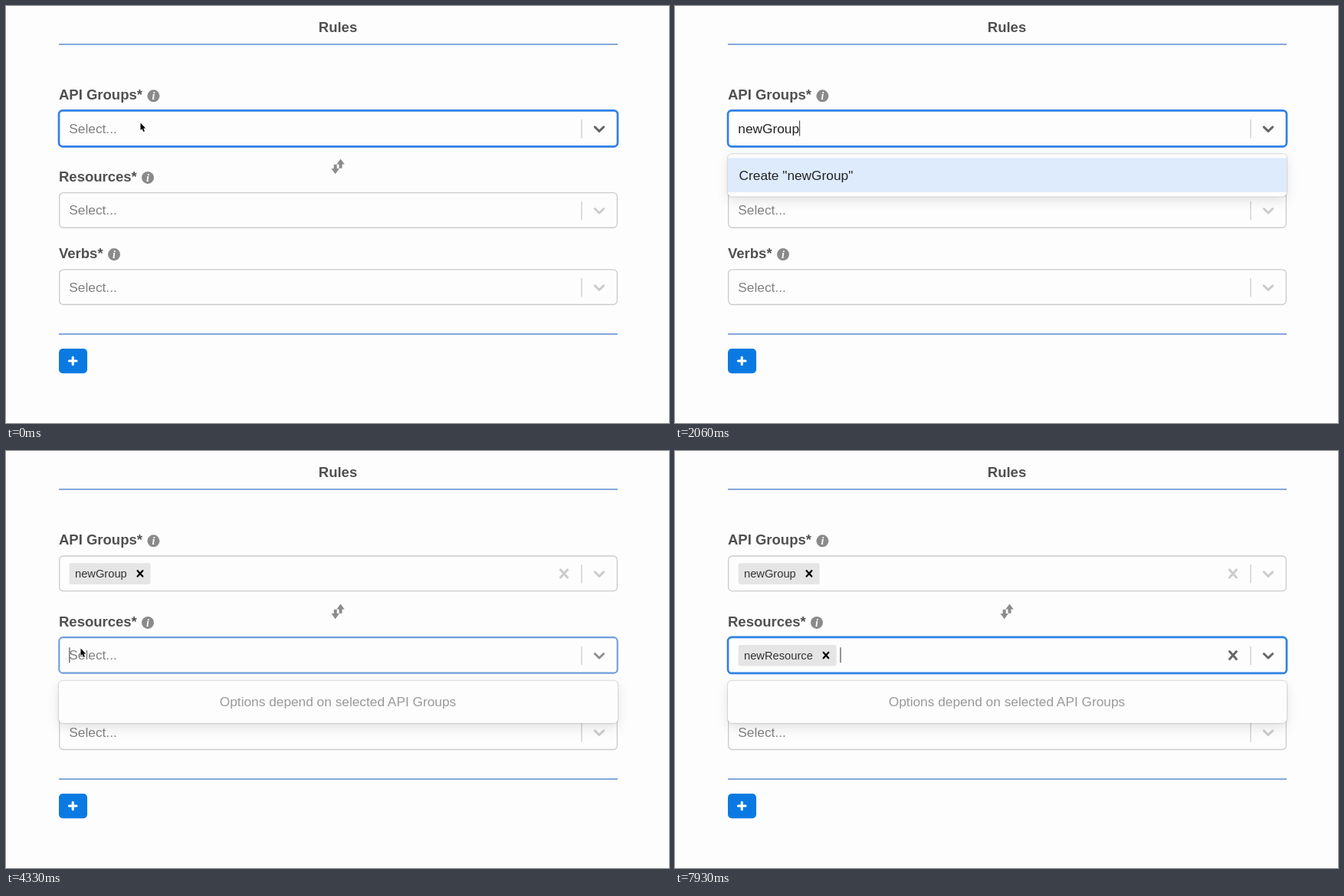
These frames come from a looping animation (865 by 544 pixels, 8000 ms). An HTML page:

```html
<!DOCTYPE html>
<html lang="en">
<head>
<meta charset="utf-8">
<title>Rules form</title>
<style>
  html, body { margin: 0; width: 100%; height: 100%; overflow: hidden; background: #fdfdfd; }
  svg { display: block; width: 100%; height: 100%; }
  text { font: 17.3px "Liberation Sans", Arial, sans-serif; fill: #222; white-space: pre; }
  .label { font-weight: bold; font-size: 18.5px; fill: #505050; }
  .hint { fill: #808080; }
  .note { fill: #999; }
  .tag { font-size: 14.7px; fill: #333; }
  .info { font: italic bold 14px "Liberation Serif", serif; fill: #fdfdfd; }
  .mid { text-anchor: middle; }
  .icon { fill: none; stroke-linecap: round; stroke-linejoin: round; }
</style>
</head>
<body>
<svg viewBox="0 0 865 544">
  <defs>
    <filter id="shadow" x="-10%" y="-60%" width="120%" height="220%">
      <feDropShadow dx="0" dy="5.3" stdDeviation="7.3" flood-color="#000" flood-opacity=".11"/>
    </filter>
  </defs>
  <g id="scene"></g>
</svg>
<script>
const LOOP = 8000, LEFT = 69, RIGHT = 798, ROW = 44.6;
const BLUE = [47, 128, 230], PALE = [204, 204, 204], DARK = [102, 102, 102];

const GROUPS = ['" " (core)', 'extensions', 'apps', 'events.k8s.io', 'authorization.k8s.io',
  'autoscaling', 'batch', 'networking.k8s.io', 'rbac.authorization.k8s.io',
  'settings.k8s.io', 'coordination.k8s.io'];

const GROUP = { word: 'newGroup', keys: [660, 860, 1060, 1330, 1530, 1700, 1860, 2060], enter: 2460 };
const RESOURCE = {
  word: 'newResource',
  keys: [4930, 5200, 5460, 5660, 6130, 6400, 6600, 6800, 7000, 7200, 7330], enter: 7860
};
const BLUR = 3800, FOCUS = 4240, OPEN = 4330;

// [time, x, y] of the pointer tip
const PATH = [[0, 175.5, 152.5], [3060, 175.5, 152.5], [3500, 75, 166], [3800, 28, 172],
  [3930, 28, 172], [4330, 97.5, 257.5], [4530, 95, 256.5], [LOOP, 95, 256.5]];

const pen = document.createElement('canvas').getContext('2d');
const widthOf = (s, size) => {
  pen.font = `${size}px "Liberation Sans", Arial, sans-serif`;
  return pen.measureText(s).width;
};
const clamp = v => Math.max(0, Math.min(1, v));
const mix = (a, b, k) => `rgb(${a.map((v, i) => Math.round(v + (b[i] - v) * k))})`;
const escape = s => s.replace(/&/g, '&amp;').replace(/</g, '&lt;');
const text = (x, y, s, cls = '') => `<text x="${x}" y="${y}" class="${cls}">${escape(s)}</text>`;
const rect = (x, y, w, h, fill, r = 0, more = '') =>
  `<rect x="${x}" y="${y}" width="${w}" height="${h}" rx="${r}" fill="${fill}" ${more}/>`;
const stroke = (d, color, width) =>
  `<path class="icon" d="${d}" stroke="${color}" stroke-width="${width}"/>`;
const rule = y => rect(LEFT, y - .7, RIGHT - LEFT, 1.4, '#5083cc');

const chevron = (y, color) => stroke(`M768.3 ${y - 2.6}l5.7 5.5 5.7-5.5`, color, 3);
const cross = (x, y, s, color) =>
  stroke(`M${x - 4.5 * s} ${y - 5 * s}l${9 * s} ${10 * s}m0 ${-10 * s}l${-9 * s} ${10 * s}`, color, 3 * s);

function label(s, y) {
  const x = LEFT + widthOf(s, 18.5) * 1.0;
  const at = { 'API Groups*': 192.4, 'Resources*': 185, 'Verbs*': 141 }[s] || x;
  return text(LEFT, y, s, 'label') + `<circle cx="${at}" cy="${y - 5}" r="8" fill="#8a8a8a"/>` +
    text(at, y - .4, 'i', 'info mid');
}

function tag(s, mid, hot) {
  const split = 90 + widthOf(s, 14.7) + 3.8;
  return rect(82.6, mid - 13.8, split + 27 - 82.6, 27.6, '#e5e5e5', 2.7) +
    (hot ? rect(split, mid - 13.8, 27, 27.6, '#f9b5ab', 2.7) : '') +
    text(90, mid + 5.1, s, 'tag') + cross(split + 13.4, mid - .2, .74, hot ? '#cb1f17' : '#000');
}

// A select box whose focus ring grows with k from 0 to 1
function select(top, { k = 0, typed = '', value = '', caret = false, hot = false } = {}) {
  const mid = top + 23.8, line = 1.33 + 1.33 * k, inset = .67 - .67 * k;
  const tone = mix(PALE, DARK, k);
  let out = rect(LEFT + inset, top + inset, RIGHT - LEFT - 2 * inset, 47 - 2 * inset, '#fdfdfd', 5,
    `stroke="${mix(PALE, BLUE, k)}" stroke-width="${line}"`);
  if (value) out += tag(value, mid, hot) + cross(728, mid - .2, 1, tone);
  else out += text(82.3, mid + 5.5, typed || 'Select...', typed ? '' : 'hint');
  if (caret) {
    const x = value ? 90 + widthOf(value, 14.7) + 35.6 : 82.3 + widthOf(typed, 17.3);
    out += rect(x, mid - 10.5, 1.1, 20, '#444');
  }
  return out + rect(750.4, mid - 12, 1.3, 24.5, '#ccc') + chevron(mid + .4, tone);
}

function menu(top, rows, { thumb = 0, note = '' } = {}) {
  const height = thumb ? 400 : ROW * Math.max(1, rows.length) + 10.4;
  const right = thumb ? 788.5 : RIGHT;
  let out = rect(LEFT, top, RIGHT - LEFT, height, '#fdfdfd', 5, 'filter="url(#shadow)"') +
    rect(LEFT - .6, top - .6, RIGHT - LEFT + 1.2, height + 1.2, 'none', 5.6,
      'stroke="#000" stroke-opacity=".1" stroke-width="1.3"');
  if (note) return out + text(433, top + 33.4, note, 'note mid');
  out += rect(LEFT, top + 5, right - LEFT, ROW, '#deebfc');
  rows.forEach((s, i) => out += text(83.6, top + 33.2 + ROW * i, s));
  if (thumb) {
    out += rect(788.5, top + .5, 9.3, height, '#f1f1f1') +
      rect(789.7, top + 9.5, 6.8, thumb, '#c1c1c1') +
      `<path d="M790.7 ${top + 6.2}l2.4-2.6 2.4 2.6z" fill="#999"/>`;
  }
  return out;
}

function pointer(t) {
  if ((t >= 860 && t < 3100) || t >= 5660) return '';
  const i = PATH.findIndex(p => p[0] > t), [t0, x0, y0] = PATH[i - 1], [t1, x1, y1] = PATH[i];
  const u = (t - t0) / (t1 - t0), e = u * u * (3 - 2 * u);
  return `<path transform="translate(${x0 + (x1 - x0) * e} ${y0 + (y1 - y0) * e})"
    d="M0 0v9.6l2.1-1.9 1.7 3.7 1.6-.7-1.6-3.6h2.9z" fill="#000" stroke="#fff" stroke-width=".7" paint-order="stroke"/>`;
}

const typedAt = (field, t) => field.word.slice(0, field.keys.filter(k => k <= t).length);

function groupMenu(t, typed) {
  if (t >= GROUP.enter) return t < BLUR ? menu(193.3, GROUPS, { thumb: 132 }) : '';
  if (!typed) return '';
  const rows = GROUPS.filter(s => s.includes(typed)).concat(`Create "${typed}"`);
  return menu(193.3, rows, { thumb: rows.length > 8 ? 261 : 0 });
}

function resourceMenu(t, typed) {
  if (t < OPEN) return '';
  return typed && t < RESOURCE.enter
    ? menu(299.9, [`Create "${typed}"`])
    : menu(299.9, [], { note: 'Options depend on selected API Groups' });
}

function draw(t) {
  const group = typedAt(GROUP, t), resource = typedAt(RESOURCE, t);
  const groupDone = t >= GROUP.enter, resourceDone = t >= RESOURCE.enter;
  return text(433, 34.3, 'Rules', 'label mid') + rule(50) + rule(428) +
    label('API Groups*', 122.3) + label('Resources*', 228.9) + label('Verbs*', 329.1) +
    `<path fill="#8c8c8c" d="M431.3 206.6l5.2-7.2 5.2 7.2h-3.2v5.2h-4v-5.2z
      M424.5 212l5.2 7.2 5.2-7.2h-3.2v-5.2h-4v5.2z"/>` +
    select(136.3, {
      k: 1 - clamp((t - BLUR) / 150), typed: group, value: groupDone ? GROUP.word : '',
      caret: group && !groupDone, hot: t >= 2530 && t < 3190
    }) +
    select(242.9, {
      k: clamp((t - FOCUS) / 150), typed: resource, value: resourceDone ? RESOURCE.word : '',
      caret: t >= OPEN
    }) +
    select(343.2) +
    rect(69, 447, 37, 32.3, '#0a7ae2', 5) + stroke('M82.4 463h9.6m-4.8-4.8v9.6', '#fff', 3.1) +
    groupMenu(t, group) + resourceMenu(t, resource) + pointer(t);
}

const scene = document.getElementById('scene');
let start, shown;
function frame(now) {
  start ??= now;
  const next = draw((now - start) % LOOP);
  if (next !== shown) scene.innerHTML = shown = next;
  requestAnimationFrame(frame);
}
scene.innerHTML = shown = draw(0);
requestAnimationFrame(frame);
</script>
</body>
</html>
```
